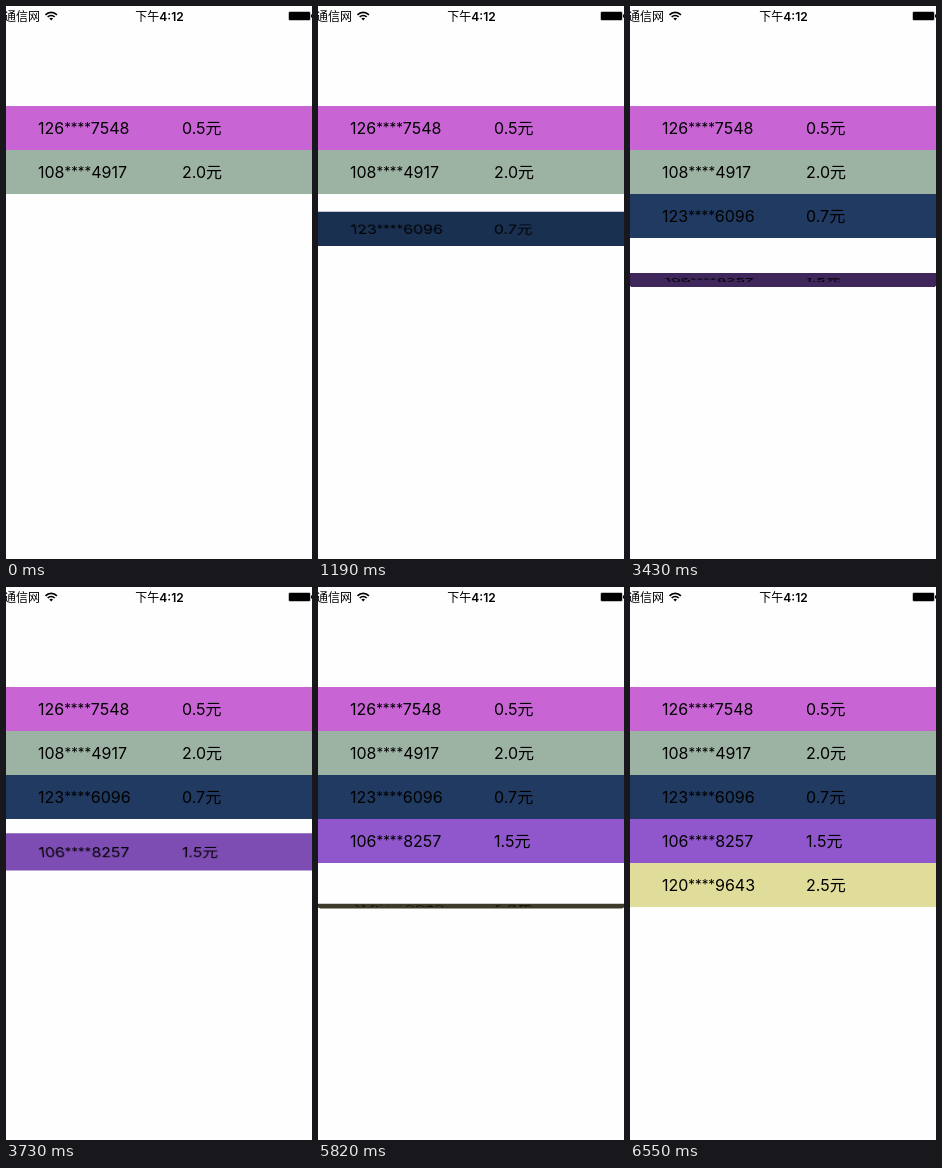
Write an HTML page that moves like this. It is 306x553 px and loops after 8000 ms.

```html
<!DOCTYPE html>
<html lang="zh-CN">
<head>
<meta charset="utf-8">
<style>
html, body { margin: 0; width: 100%; height: 100%; overflow: hidden; background: #fefefe; }
body { position: relative; color: #000; font: 16px/44px Inter, "Noto Sans CJK SC", "Noto Sans CJK", sans-serif; }
.row { position: absolute; left: -7px; width: 320px; height: 44px; white-space: nowrap; }
.row span { position: absolute; left: 39px; top: 0; }
.row span + span { left: 183px; }
.row small { position: relative; top: -2px; font-size: 13.3px; line-height: 0; }
.status { position: absolute; top: 1px; font-size: 12px; line-height: 20px; white-space: nowrap; }
.time { left: 0; width: 307px; text-align: center; font-weight: 500; }
.time b { font-weight: 600; }
svg { position: absolute; left: 0; top: 0; }
</style>
</head>
<body>
<div class="status" style="left:-2px">通信网</div>
<div class="status time">下午<b>4:12</b></div>
<svg width="306" height="20" fill="none" stroke="#000">
  <path d="M39.5 8.8a8 8 0 0 1 11.4 0M41.7 11a5 5 0 0 1 7 0" stroke-width="1.7"/>
  <path d="M45.2 14.4l-1.8-1.9a2.6 2.6 0 0 1 3.6 0z" fill="#000" stroke="none"/>
  <rect x="282.5" y="5.5" width="22" height="9" rx="1.5" stroke="#999" stroke-width=".6"/>
  <rect x="283" y="6" width="21" height="8" rx=".8" fill="#000" stroke="none"/>
  <path d="M305.5 8.5v3"/>
</svg>
<script>
const LOOP = 8000, TURN = 700, HALF = 22;

// phone start and end, amount, colour, start of the turn, moments at which the screen refreshes
const rows = [
  ["126", "7548", "0.5元", "#c864d4"],
  ["108", "4917", "2.0元", "#9cb2a3"],
  ["123", "6096", "0.7元", "#203a62", 780, [900, 1050, 1190, 1340, 1480]],
  ["106", "8257", "1.5元", "#8f57cb", 3270, [3430, 3580, 3730, 3880, 4020]],
  ["120", "9643", "2.5元", "#e0dc9a", 5755, [5820, 5970, 6120, 6260, 6410, 6550]],
].map(([head, tail, amount, color, start, refresh], i) => {
  const el = document.createElement("div");
  el.className = "row";
  el.style.top = 100 + i * 44 + "px";
  el.style.background = color;
  el.innerHTML = `<span>${head}<small>****</small>${tail}</span><span>${amount}</span>`;
  document.body.append(el);
  return { el, start, refresh };
}).filter(row => row.refresh);

// Each new row turns in from below like the face of a cube.
function draw(now) {
  const t = now % LOOP;
  for (const { el, start, refresh } of rows) {
    const shown = refresh.filter(moment => moment <= t).pop();
    el.style.visibility = shown ? "visible" : "hidden";
    if (!shown) continue;
    const angle = 90 * Math.max(0, 1 - (shown - start) / TURN);
    const light = 0.15 + 0.85 * Math.cos(angle * Math.PI / 180);
    el.style.transform = angle
      ? `perspective(654px) translateZ(${-HALF}px) rotateX(${-angle}deg) translateZ(${HALF}px)`
      : "none";
    el.style.filter = angle ? `brightness(${light})` : "none";
  }
}

const begin = performance.now();
function tick() {
  draw(performance.now() - begin);
  requestAnimationFrame(tick);
}
tick();
</script>
</body>
</html>
```
